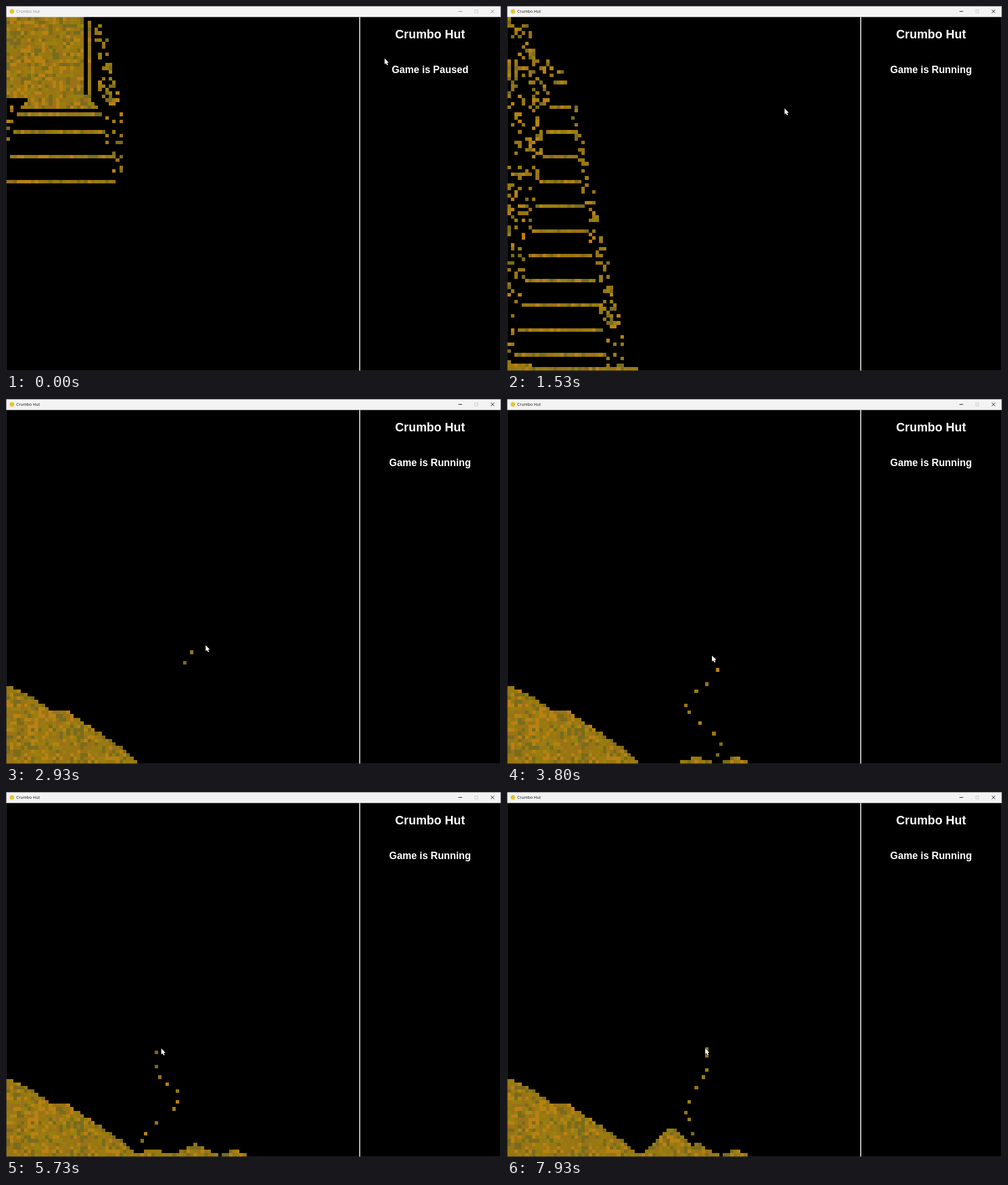
These frames come from a looping animation (872x642 px, 8 s). An HTML page with a canvas:

```html
<!DOCTYPE html>
<html lang="en">
<head>
<meta charset="utf-8">
<title>Crumbo Hut</title>
<style>
  html, body { margin: 0; width: 100%; height: 100%; overflow: hidden; background: #000; }
  canvas { display: block; }
</style>
</head>
<body>
<canvas id="stage" width="872" height="642"></canvas>
<script>
const ctx = document.getElementById('stage').getContext('2d');
const LOOP = 8000, CELL = 6.22, LEFT = .65, TOP = 19.4, SIZE = 100;
const STEP = 11.1;    // ms per row of fall
const RUN_AT = 830;   // game leaves pause
const FOCUS_AT = 300; // window becomes active
const POUR_AT = 2870; // hand starts to sprinkle
const NAME = 'Crumbo Hut';
const SAND = ['#b88114', '#997f10', '#9a7218', '#7a6c1c', '#99780f'];

function hash(a, b) {
  let h = Math.imul(a + 311, 374761393) ^ Math.imul(b + 977, 668265263);
  h = Math.imul(h ^ (h >>> 13), 1274126177);
  h = Math.imul(h ^ (h >>> 15), 2246822519);
  return ((h ^ (h >>> 16)) >>> 0) / 4294967296;
}

const clamp = x => Math.max(0, Math.min(1, x));

// Linear value of column n in a list of keys [x, v1, v2, ...]
function at(keys, x, n = 1) {
  const i = keys.findIndex(k => k[0] > x);
  if (i < 0) return keys[keys.length - 1][n];
  if (i === 0) return keys[0][n];
  const a = keys[i - 1], b = keys[i];
  return a[n] + (b[n] - a[n]) * (x - a[0]) / (b[0] - a[0]);
}

// (a, b) picks the shade
function cell(c, r, a, b) {
  const x = Math.round(LEFT + c * CELL), y = Math.round(TOP + r * CELL);
  ctx.fillStyle = SAND[Math.floor(hash(a * 3 + 7, b * 5 + 1) * SAND.length)];
  ctx.fillRect(x, y, Math.round(LEFT + (c + 1) * CELL) - x, Math.round(TOP + (r + 1) * CELL) - y);
}

// Slope of the finished hill: column, height
const SLOPE = [[0, 22], [2, 21.4], [8, 18], [13, 14.5], [17, 14.6], [21, 12], [33, 4], [37, 0]];

// Poured heaps: start, end, centre column, height, steepness
const HEAPS = [
  [2990, 3800, 53, 2.2, .4],
  [2990, 3800, 64, 2, .5],
  [3800, 5730, 53, 3.6, .45],
  [4100, 5600, 41, 2.2, .3],
  [5730, 7930, 46, 8.4, .9]
];

function height(c, t) {
  const level = 22 * Math.pow(clamp((t - 1424) / 1116), 1.15);
  let top = Math.min(at(SLOPE, c), level * (1 + Math.max(0, 7 - c) * .03));
  for (const [start, end, mid, peak, steep] of HEAPS)
    if (t > start) top = Math.max(top, peak * clamp((t - start) / (end - start)) - Math.abs(c - mid) * steep);
  return Math.round(top);
}

// Shaking hand: time, centre column, reach
const SWAY = [
  [2870, 56, 6], [3800, 54.5, 4.5], [4500, 41, 7], [5300, 42, 6],
  [5730, 45.5, 3.5], [7200, 45, 4], [7930, 55, 2]
];
const hand = t => ({
  c: at(SWAY, t) + at(SWAY, t, 2) * Math.cos((t - 5564) / 257 * Math.PI * 2),
  r: 67.5 + 1.5 * Math.cos(t / 310)
});

const drops = [];
for (let i = 0, t = POUR_AT; t < LOOP; t += 20 + 22 * hash(i++, 5)) {
  const p = hand(t);
  drops.push({ t, c: Math.round(p.c), r: Math.round(p.r) });
}

// Mouse before pouring: time, x, y
const MOVES = [
  [70, 667, 92], [130, 686, 168], [270, 686, 168], [1000, 493, 172],
  [1200, 490, 174], [1530, 489, 180], [1930, 408, 202], [2070, 406, 293], [2800, 371, 440]
];

function mouse(t) {
  const k = clamp((t - 2800) / 70), p = hand(t);
  const x = at(MOVES, t), y = at(MOVES, t, 2);
  return [x + (LEFT + (p.c + .5) * CELL - x) * k, y + (TOP + (p.r + .5) * CELL - y) * k];
}

function drawSand(t) {
  const s = Math.max(0, Math.floor((t - RUN_AT) / STEP));
  const eaten = Math.min(s, 69) / 3;
  const gone = Math.max(0, s - 69);          // rows emptied above the last grains
  const w = Math.round(22 - eaten), h = Math.round(23 - eaten);
  const ground = [];
  for (let c = 0; c < SIZE; c++) ground[c] = SIZE - height(c, t);

  // loose grains on both sides of the falling layers
  for (let c = 0; c < 33; c++) {
    for (let r = gone; r < ground[c]; r++) {
      const k = r - s, u = (46 - k) / 7;
      if (u < 0 || (r < h && c < w + 3)) continue;
      const left = c < u - 1;
      const right = c > 29.5 - u || (r < 15 && c >= w + 3);
      const edge = Math.max(Math.min(36 - 1.4 * u, w + 3 + (r - gone) * .6), u > 12 ? 3 : 0);
      if ((left || right) && c <= edge && hash(c, k) < .27) cell(c, r, c, k);
    }
  }

  // layers that let go one after another
  for (let i = 0; i < 15; i++) {
    const rest = 29 - i, fall = 46 + s - 7 * i;
    const r = fall > rest - 2 ? Math.max(fall, rest + 1) : rest;
    const end = i ? 29 - i : 30;
    for (let c = i; c <= end; c++) if (r < ground[c]) cell(c, r, c, i + 200);
  }

  // resting block with its comb edge and detached column
  for (let c = 0; c < w; c++) {
    const comb = s > 3 && c % 2 ? Math.floor(hash(c, h) * 4) : 0;
    for (let r = 0; r < h + comb; r++) cell(c, r, c, r);
  }
  if (w > 3) for (let r = 1; r < h; r++) cell(w + 1, r, w + 1, r);

  for (const d of drops) {
    const r = d.r + Math.round((t - d.t) / STEP);
    if (t >= d.t && r < ground[d.c]) cell(d.c, r, d.c, Math.round(d.t));
  }

  for (let c = 0; c < SIZE; c++)
    for (let r = ground[c]; r < SIZE; r++) cell(c, r, c, r + 400);
}

function line(x1, y1, x2, y2) {
  ctx.beginPath();
  ctx.moveTo(x1, y1);
  ctx.lineTo(x2, y2);
  ctx.stroke();
}

function drawWindow(t) {
  const active = t >= FOCUS_AT;
  ctx.fillStyle = '#f3f3f3';
  ctx.fillRect(0, 0, 872, TOP);
  ctx.fillStyle = '#e3c72f';
  ctx.beginPath();
  ctx.arc(10.5, 9.5, 4, 0, Math.PI * 2);
  ctx.fill();

  ctx.textAlign = 'left';
  ctx.font = '7.2px "Open Sans", sans-serif';
  ctx.fillStyle = active ? '#111' : '#8c8c8c';
  ctx.fillText(NAME, 18, 12.3);

  ctx.lineWidth = 1;
  ctx.strokeStyle = active ? '#111' : '#888';
  line(797, 9.5, 803.5, 9.5);
  line(854, 6.5, 860, 12.5);
  line(860, 6.5, 854, 12.5);
  ctx.strokeStyle = '#c8c8c8';
  ctx.strokeRect(826, 7, 5, 5);

  ctx.fillStyle = '#fff';
  ctx.fillRect(622.4, TOP, 1.6, 622);
  ctx.textAlign = 'center';
  ctx.font = 'bold 21.3px "Liberation Sans", Arial, sans-serif';
  ctx.fillText(NAME, 747, 57);
  ctx.font = 'bold 17.5px "Liberation Sans", Arial, sans-serif';
  ctx.fillText(t < RUN_AT ? 'Game is Paused' : 'Game is Running', 747, 118);

  ctx.fillStyle = '#3c3f42';
  ctx.fillRect(0, 0, 872, .6);
  ctx.fillRect(0, 0, LEFT, 642);
  ctx.fillRect(871.3, 0, .7, 642);
  ctx.fillRect(0, 641.4, 872, .6);
}

const ARROW = new Path2D('M0 0V10.5L2.4 8.4L4.2 12.3L6 11.5L4.2 7.7H7.4Z');

function drawCursor(t) {
  ctx.save();
  ctx.translate(...mouse(t));
  ctx.lineWidth = 1;
  ctx.strokeStyle = '#000';
  ctx.stroke(ARROW);
  ctx.fillStyle = '#fff';
  ctx.fill(ARROW);
  ctx.restore();
}

function draw(now) {
  const t = now % LOOP;
  ctx.fillStyle = '#000';
  ctx.fillRect(0, 0, 872, 642);
  drawSand(t);
  drawWindow(t);
  drawCursor(t);
}

let start;
function tick(now) {
  if (start === undefined) start = now;
  draw(Math.max(0, now - start));
  requestAnimationFrame(tick);
}
draw(0);
requestAnimationFrame(tick);
</script>
</body>
</html>
```
